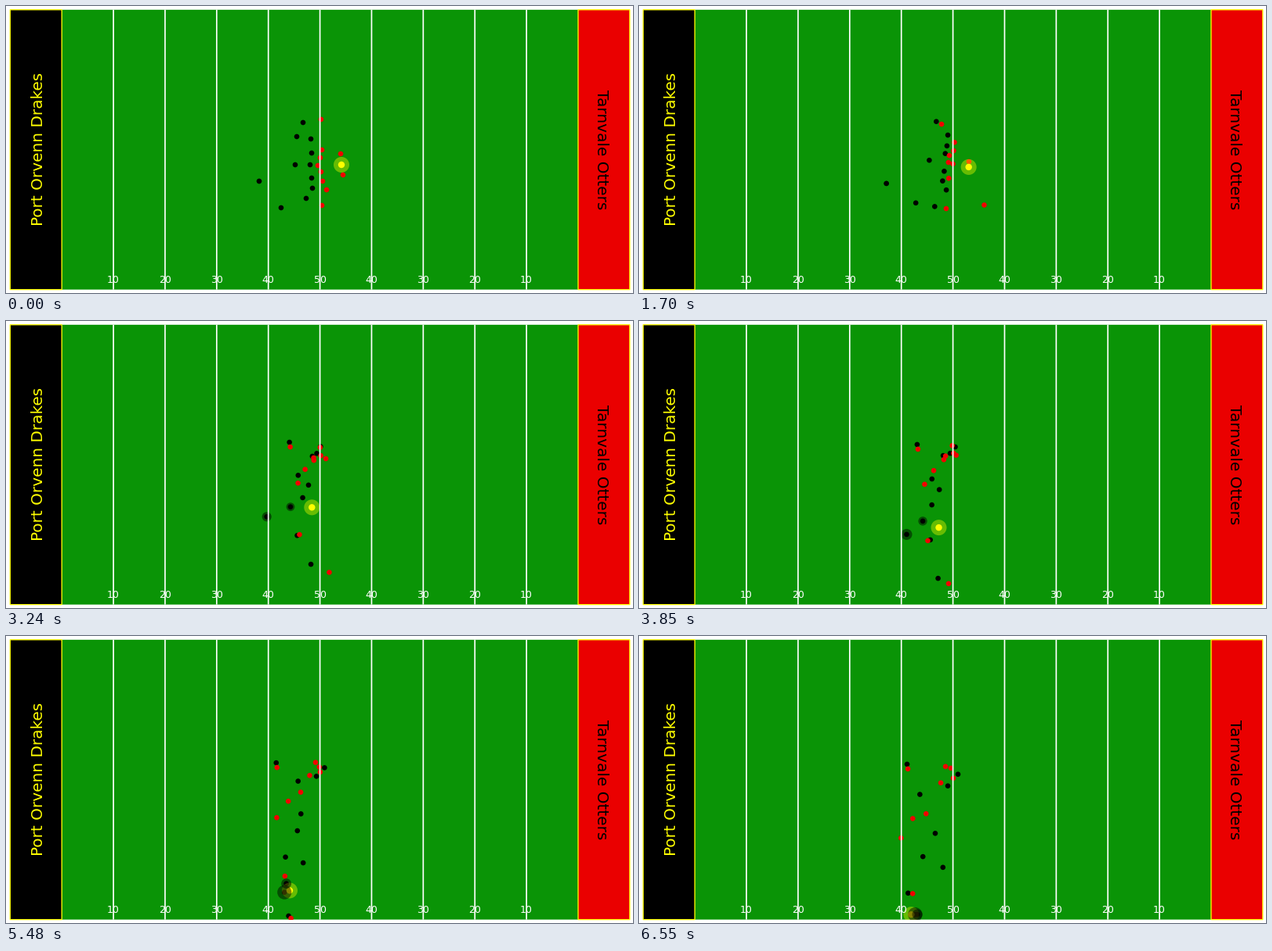
Recreate the animation shown at these times as a matplotlib script. Size 800 by 367 pixels, loop 6580 ms.

```python
import numpy as np
import matplotlib.pyplot as plt
from matplotlib.animation import FuncAnimation
from matplotlib.patches import Circle, Rectangle

W, H = 800, 367
LOOP, FRAMES = 6580, 235
PT = 0.72  # points per pixel at 100 dpi
X0, TEN_YARDS = 5.3, 65.88
TOP, BOTTOM = 4.8, 362.6
GREEN, RED, YELLOW = "#0a9406", "#ea0000", "#ffff00"
SNAP, WHISTLE = 800, 6550
MARKS = np.array([0, 1210, 3240, 4480, WHISTLE])


def progress(t, t0, t1):
    return np.clip((t - t0) / (t1 - t0), 0, 1)


def run(start, end, bend):
    """Steady across the field, accelerating down it, bowed out by bend."""
    (xa, ya), (xb, yb), (bx, by) = start, end, bend

    def at(t):
        u = progress(t, SNAP, WHISTLE)
        bow = np.sin(np.pi * u)
        return np.array([xa + (xb - xa) * u + bx * bow,
                         ya + (yb - ya) * u * u + by * bow])

    return at


def curve(*points):
    """Smooth path through one key point per mark."""
    p = np.array(points, float)
    slope = np.gradient(p, MARKS, axis=0)

    def at(t):
        i = np.clip(np.searchsorted(MARKS, t, side="right") - 1, 0, len(MARKS) - 2)
        h = MARKS[i + 1] - MARKS[i]
        u = progress(t, MARKS[i], MARKS[i + 1])
        ease = u * u * (3 - 2 * u)
        return (p[i] + (p[i + 1] - p[i]) * ease
                + h * u * (1 - u) * ((1 - u) * slope[i] - u * slope[i + 1]))

    return at


def follow(leader, far, near, t0, t1, power=1):
    """Trail a leader while the gap closes from far to near."""
    far, near = np.array(far), np.array(near)

    def at(t):
        left = (1 - progress(t, t0, t1)) ** power
        return leader(t) + near + (far - near) * left

    return at


# Ball carrier, the back trailing for the pitch, and the man on the edge
carrier = curve((428, 203), (426.5, 202), (390, 239), (375, 293), (347, 357))
pitch = curve((427, 189), (442, 234), (412, 322), (377, 347), (355, 374))
edge = curve((351, 258), (351, 257), (363, 238), (360, 281), (355, 357))
safety = follow(carrier, (-105, 21), (5, 0), 1700, WHISTLE, 1.5)

wideout = run((402, 145), (343, 170), (-15, 12))
offense = [
    wideout,
    run((403, 184), (391, 167), (3, -20)),
    run((401, 194), (398, 169), (2, -18)),
    run((398, 204), (385, 188), (0, -27)),
    run((402, 212), (349, 234), (2, -27)),
    run((404, 224), (366, 228), (5, -48)),
    run((409, 235), (334, 259), (-5, -33)),
    run((403, 255), (349, 330), (-6, 5)),
    run((430, 216), (401, 182), (-10, -35)),
    pitch,
]
defense = [
    follow(wideout, (-23, 4), (-1, -6), 0, 2270),
    follow(pitch, (-56, -22), (-3, -3), 1210, 4480),
    run((389, 170), (407, 177), (5, -11)),
    run((390, 188), (394, 192), (5, -20)),
    run((388, 203), (358, 203), (16, -31)),
    run((369, 203), (378, 253), (0, -15)),
    run((390, 220), (362, 283), (8, -22)),
    run((391, 233), (343, 330), (8, -25)),
    run((383, 246), (388, 296), (-14, 20)),
    safety,
    edge,
]

plt.rcParams["font.family"] = "DejaVu Sans"
fig = plt.figure(figsize=(W / 100, H / 100), dpi=100, facecolor="white")
ax = fig.add_axes([0, 0, 1, 1])
ax.set(xlim=(0, W), ylim=(H, 0))
ax.axis("off")


def yard_x(k):
    return X0 + k * TEN_YARDS


def box(k0, k1, color, edge_color, z):
    return ax.add_patch(Rectangle(
        (yard_x(k0), TOP), yard_x(k1) - yard_x(k0), BOTTOM - TOP, fc=color,
        ec=edge_color, lw=1.3 * PT, zorder=z, snap=False))


def label(x, y, text, color, size, angle=0):
    ax.text(x, y, text, color=color, fontsize=size * PT, rotation=angle,
            rotation_mode="anchor", ha="center", va="baseline", zorder=9)


field = box(1, 11, GREEN, "none", 0)
box(0, 1, "black", YELLOW, 1)
box(11, 12, RED, YELLOW, 1)
label(47, 183, "Port Orvenn Drakes", YELLOW, 20, 90)
label(754.5, 183.5, "Tarnvale Otters", "black", 20, 270)

for k in range(1, 10):
    x = yard_x(k + 1)
    ax.plot([x, x], [TOP, BOTTOM], color="white", lw=1.7 * PT, zorder=8,
            solid_capstyle="butt", snap=False)
    label(x, 354.3, str(10 * min(k, 10 - k)), "white", 12.5)

movers = []


def dot(path, color, radius, z, alpha=1):
    c = ax.add_patch(Circle((0, 0), radius, fc=color, ec="none", alpha=alpha, zorder=z))
    c.set_clip_path(field)
    movers.append((c, path))
    return c


for path in defense:
    dot(path, "black", 3.3, 3)
for path in offense:
    dot(path, "#f20000", 3.3, 4)
dot(carrier, YELLOW, 10, 5, 0.38)
dot(carrier, YELLOW, 4.2, 5)
halos = [(dot(path, "black", 0, 6, 0.48), path, reach)
         for path, reach in ((safety, 9.5), (edge, 7))]


def draw(n):
    t = n * LOOP / FRAMES
    for c, path in movers:
        c.center = path(t)
    # Halos swell as a tackler closes on the ball
    for c, path, reach in halos:
        c.set_radius(max(0, reach - np.hypot(*(path(t) - carrier(t))) / 17))
    return [c for c, _ in movers]


anim = FuncAnimation(fig, draw, frames=FRAMES, interval=LOOP // FRAMES,
                     repeat=True, repeat_delay=0)
plt.show()
```
